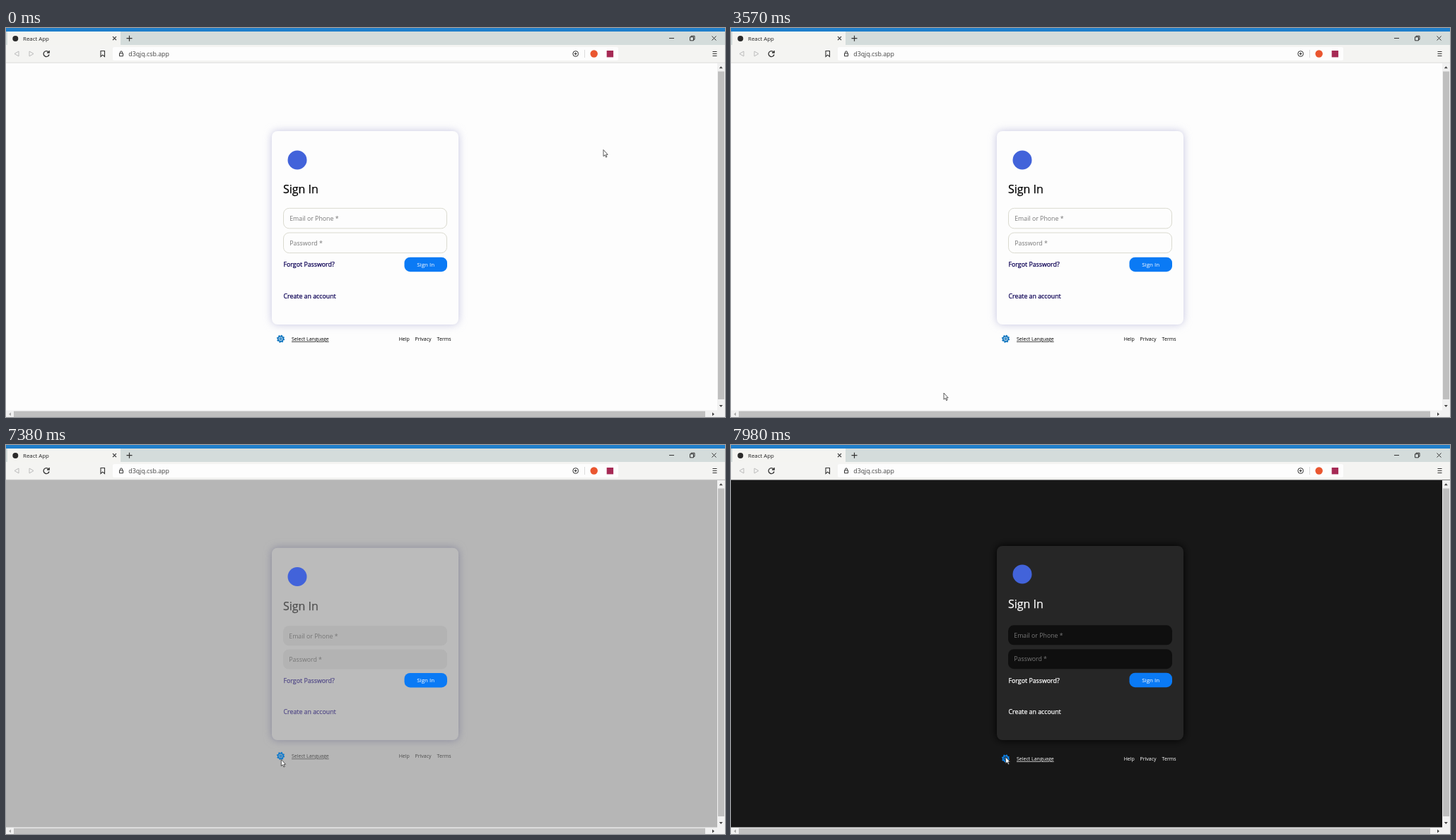
An HTML page for the animation above (8000 ms loop, 1017 by 551 pixels).

```html
<!DOCTYPE html>
<html lang="en">
<head>
<meta charset="utf-8">
<title>Sign In</title>
<style>
  html, body { margin: 0; width: 100%; height: 100%; overflow: hidden; background: #fdfdfd; }
  svg { display: block; width: 1017px; height: 551px; }
  text { font-family: "Open Sans", "Noto Sans", sans-serif; font-size: 8.8px; }
  .line { fill: none; stroke: #333; }
  .bold { stroke-width: .25px; }
  #footer text { font-size: 7px; }
</style>
</head>
<body>
<svg viewBox="0 0 1017 551">
  <defs>
    <filter id="blur" x="-20%" y="-20%" width="140%" height="140%"><feGaussianBlur stdDeviation="6"/></filter>
  </defs>

  <rect id="page" y="49" width="1017" height="493"/>

  <rect id="shadow" x="376" width="264" rx="8" filter="url(#blur)"/>
  <rect id="card" x="376" width="264" rx="8"/>
  <circle id="logo" cx="412" r="13.5" fill="#4263da"/>
  <text id="title" class="bold" x="392" style="font-size:16px">Sign In</text>
  <rect id="emailBox" rx="8"/>
  <rect id="passBox" rx="8"/>
  <text id="email" fill="#777">Email or Phone *</text>
  <text id="pass" fill="#777">Password *</text>
  <text id="forgot" class="bold" x="392.5">Forgot Password?</text>
  <text id="create" class="bold" x="392.5">Create an account</text>
  <g id="button">
    <rect x="563.5" width="60.5" height="20.5" rx="8" fill="#0a7af5"/>
    <text x="593.7" y="13.3" text-anchor="middle" fill="#fff" style="font-size:8px">Sign In</text>
  </g>
  <g id="footer">
    <g id="gear" transform="translate(388.5 0)" fill="none">
      <circle r="3.7" stroke-width="1.8"/>
      <circle r="4.9" stroke-width="1.4" stroke-dasharray="1.9 1.95"/>
      <circle r="1.3" stroke-width="1.4"/>
    </g>
    <text x="404" y="3" text-decoration="underline">Select Language</text>
    <text x="555.7" y="3">Help</text>
    <text x="578.5" y="3">Privacy</text>
    <text x="609.6" y="3">Terms</text>
  </g>

  <!-- browser window -->
  <rect width="1017" height="24" fill="#d4dcdb"/>
  <rect width="1017" height="5" fill="#1f7fcb"/>
  <rect x="2" y="5" width="160" height="20" fill="#f4f4f1"/>
  <rect y="24" width="1017" height="25" fill="#f4f4f2"/>
  <rect x="151" y="27" width="715" height="19" rx="2" fill="#fdfdfd"/>
  <path d="M0 49.2H1017" stroke="#d4d4d4" stroke-width=".8"/>
  <circle cx="13.3" cy="15" r="4" fill="#2b2b2b"/>
  <text x="24" y="17.7" fill="#222" style="font-size:7.9px">React App</text>
  <text x="173.3" y="39.8" fill="#444">d3qjq.csb.app</text>
  <g class="line">
    <path d="M151 12.2l5 5m0-5l-5 5M170.5 14.7h8m-4-4v8" stroke-width="1.2"/>
    <path d="M938 14.5h7M967.5 12.8h5v5h-5zM969 12.8v-1.5h5v5h-1.5M998.5 11.5l6 6m0-6l-6 6"/>
    <path d="M18 33v7l-6-3.5zM33 33v7l6-3.5z" stroke="#bbb"/>
    <path d="M60.3 34.2A4 4 0 1 0 61 37.5M61.2 32v3h-3.2" stroke-width="1.3"/>
    <path d="M134 32.5h5.5v8l-2.75-2.3-2.75 2.3z" stroke-width="1.1"/>
    <path d="M160.5 35.8h5v4h-5zM161.5 35.8v-1.4a1.5 1.5 0 0 1 3 0v1.4"/>
    <circle cx="805.7" cy="36.5" r="3.9"/>
    <path d="M803.7 36.5h4m-2-2v4M999.5 33.5h6m-6 3h6m-6 3h6"/>
    <path d="M818.5 31v11" stroke="#ddd"/>
  </g>
  <circle cx="831.7" cy="36.5" r="5.2" fill="#ea5630"/>
  <rect x="849.7" y="32" width="9.4" height="9.4" fill="#a62a55"/>

  <!-- scrollbars -->
  <path d="M1006 50h11v501H0v-9.5h1006z" fill="#f1f1f1"/>
  <path d="M1007 61.5h9V526h-9zM11 542.7h978v8.3H11z" fill="#bfbfbf"/>
  <path d="M1008.8 57.3h5l-2.5-3zM1008.8 534h5l-2.5 3zM999 544.5v5l3-2.5z" fill="#444"/>
  <path d="M7 544.5v5l-3-2.5z" fill="#aaa"/>

  <path id="arrow" d="M0 0V9.2L2.1 7.3 3.6 10.6 5 10 3.6 6.8H6.2z" fill="#fff" stroke="#333" stroke-width=".8"/>
  <path id="beam" class="line" d="M-2 -4.5H-.5L0 -4 .5 -4.5H2M0 -4V4M-2 4.5H-.5L0 4 .5 4.5H2"/>
</svg>
<script>
const LOOP = 8000, SWITCH = 7278, FADE = 500;
const $ = id => document.getElementById(id);
const set = (id, attrs) => { for (const k in attrs) $(id).setAttribute(k, attrs[k]); };
const mix = (a, b, p) => a + (b - a) * p;
const color = (a, b, p) => `rgb(${a.map((v, i) => Math.round(mix(v, b[i], p)))})`;
const gray = (a, b, p) => color([a, a, a], [b, b, b], p);

// cursor stops: time, x, y
const stops = [
  [0, 845, 172.5], [40, 845, 172.5], [240, 895, 156], [840, 178, 420], [1000, 110, 470],
  [1400, 301, 517], [3640, 301, 517], [4440, 400, 345], [4800, 424, 271], [5280, 424, 271],
  [6080, 389.5, 449], [6500, 389.5, 453.5], [7060, 389.5, 453.5], [7220, 389.3, 445.5],
  [7780, 389.3, 445.5], [7940, 388.5, 442], [8000, 388.5, 442]
];

function cursorAt(t) {
  const i = stops.findIndex(s => s[0] > t);
  const [t0, x0, y0] = stops[i - 1], [t1, x1, y1] = stops[i];
  const u = (t - t0) / (t1 - t0), p = u * u * (3 - 2 * u);
  return [mix(x0, x1, p), mix(y0, y1, p)];
}

// cubic-bezier(.25, .1, .25, 1)
function ease(x) {
  if (x <= 0) return 0;
  if (x >= 1) return 1;
  const curve = (a, b, s) => 3 * a * s * (1 - s) ** 2 + 3 * b * s * s * (1 - s) + s ** 3;
  let lo = 0, hi = 1;
  for (let i = 0; i < 20; i++) {
    const mid = (lo + hi) / 2;
    if (curve(.25, .25, mid) < x) lo = mid; else hi = mid;
  }
  return curve(.1, 1, lo);
}

function draw(t) {
  const dark = t >= SWITCH, p = ease((t - SWITCH) / FADE);
  // light layout, or the dark layout settling after its borders vanish
  const at = (light, from, to) => dark ? mix(from, to, p) : light;

  const top = at(146, 146.8, 143), height = at(420, 418, 418) - top;
  const ink = gray(0, 255, p), link = color([12, 0, 85], [255, 255, 255], p);
  set('page', { fill: gray(253, 23, p) });
  set('shadow', { y: top, height, fill: color([196, 196, 224], [0, 0, 0], p) });
  set('card', { y: top, height, fill: gray(253, 38, p) });
  set('logo', { cy: at(187, 188, 183) });
  set('title', { y: at(234.3, 235.3, 231.3), fill: ink, stroke: ink });

  const shift = at(0, 1.3, 0);
  const box = {
    x: dark ? 392 : 392.5, width: dark ? 232 : 231, height: dark ? 28 : 28.6,
    fill: gray(253, 15, p), stroke: dark ? 'none' : '#dadacf'
  };
  set('emailBox', { ...box, y: 255.3 + shift });
  set('passBox', { ...box, y: at(290, 289.8, 289.2) });
  const labelX = dark ? 400.3 : 401.2;
  set('email', { x: labelX, y: 272.7 + shift });
  set('pass', { x: labelX, y: at(307.7, 306.7, 306.4) });

  set('forgot', { y: at(338.2, 337, 336.6), fill: link, stroke: link });
  set('create', { y: at(383.2, 381.5, 381.3), fill: link, stroke: link });
  set('button', { transform: `translate(0 ${at(324.7, 323, 322.7)})` });
  set('footer', { transform: `translate(0 ${at(440.3, 438.8, 444)})`, fill: ink });
  set('gear', { stroke: color([14, 116, 190], [14, 132, 235], p) });

  const [x, y] = cursorAt(t);
  const typing = x > 392 && x < 624 && (y > 255 && y < 284 || y > 290 && y < 319);
  const place = `translate(${x.toFixed(1)} ${y.toFixed(1)})`;
  set('arrow', { transform: place, display: typing ? 'none' : 'inline' });
  set('beam', { transform: place, display: typing ? 'inline' : 'none' });
}

const start = performance.now();
function tick() {
  draw((performance.now() - start) % LOOP);
  requestAnimationFrame(tick);
}
tick();
</script>
</body>
</html>
```
